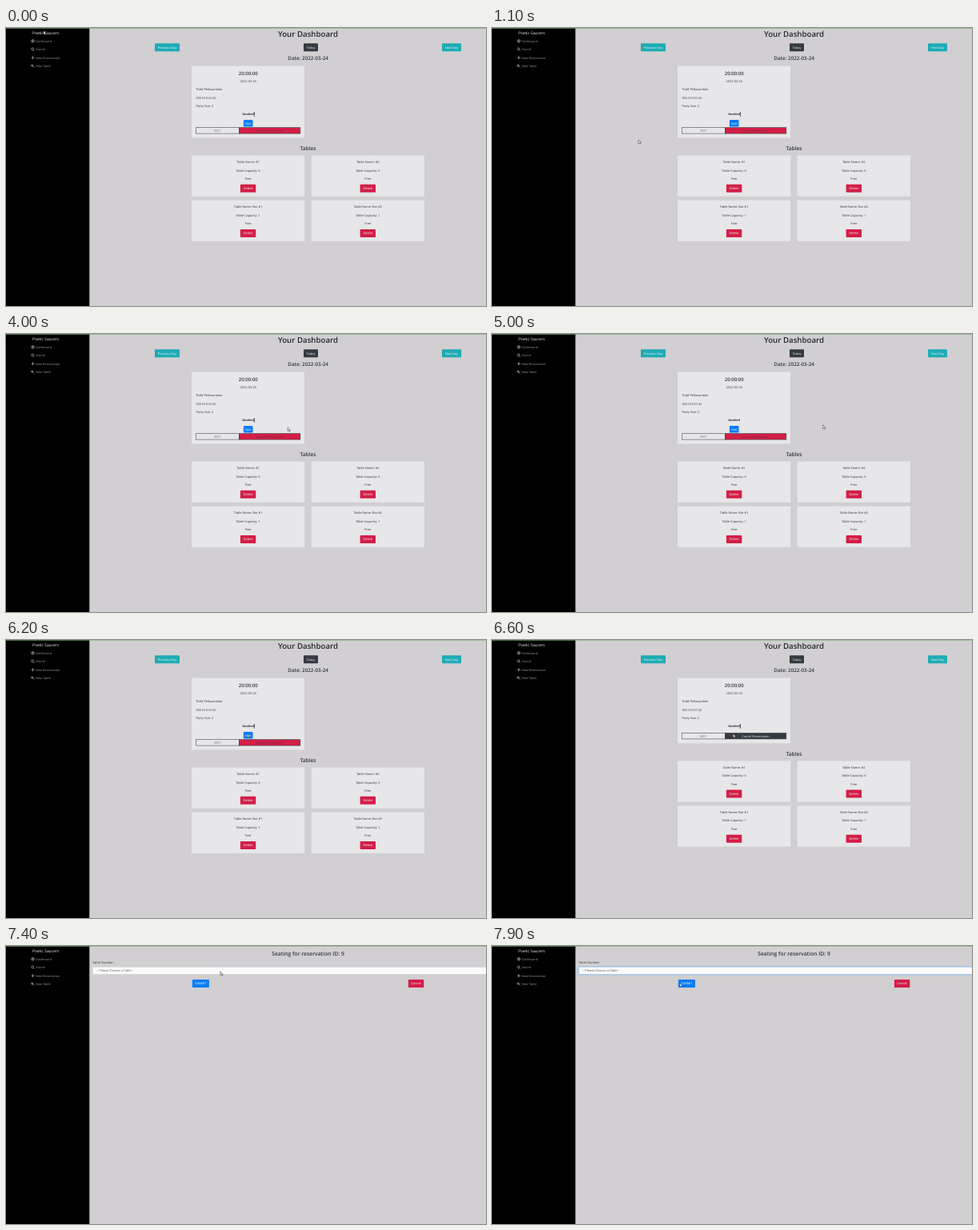
Recreate the animation shown at these times as an HTML page. Size 600 by 348 pixels, loop 8000 ms.

```html
<!DOCTYPE html>
<html lang="en">
<head>
<meta charset="utf-8">
<title>Reservation dashboard</title>
<style>
  html, body { margin: 0; width: 100%; height: 100%; overflow: hidden; background: #d1cfd1; }
  svg { display: block; width: 100%; height: 100%; }
  text {
    font-family: "Open Sans", "Noto Sans", sans-serif;
    text-rendering: geometricPrecision;
    white-space: pre;
  }
</style>
</head>
<body>
<svg id="stage" viewBox="0 0 600 348"></svg>
<script>
const LOOP = 8000, STEP = 100;
const SEAT_HIDDEN = 6600, SEATING_PAGE = 6700, SELECT_FOCUS = 7500;
const BODY = 3.9, ROW_SHIFT = -8.2;
const INK = "#35363a", DARK = "#343a40", RED = "#d41e47", BLUE = "#087df5", TEAL = "#1eabb5";
const stage = document.getElementById("stage");

function add(parent, tag, attrs) {
  const node = document.createElementNS("http://www.w3.org/2000/svg", tag);
  for (const key in attrs) node.setAttribute(key, attrs[key]);
  return parent.appendChild(node);
}
const group = parent => add(parent, "g", {});
const rect = (parent, x, y, width, height, fill, more) =>
  add(parent, "rect", { x, y, width, height, fill, ...more });

// y is the visual middle of the line
function label(parent, text, x, y, { size = BODY, fill = INK, weight = 400, anchor = "middle" } = {}) {
  const node = add(parent, "text", {
    x, y: y + size * 0.35, fill, "font-size": size, "font-weight": weight, "text-anchor": anchor
  });
  node.textContent = text;
  return node;
}
function button(parent, text, cx, cy, w, h, fill) {
  const node = group(parent);
  rect(node, cx - w / 2, cy - h / 2, w, h, fill, { rx: 0.9 });
  label(node, text, cx, cy, { fill: "#f4f6f8" });
  return node;
}
const show = (node, on) => node.setAttribute("display", on ? "inline" : "none");
const moveTo = (node, x, y) => node.setAttribute("transform", `translate(${x} ${y})`);

rect(stage, 0, 0, 600, 348, "#d1cfd1");

function buildDashboard() {
  const page = group(stage);
  label(page, "Your Dashboard", 377.5, 7.5, { size: 9.7, weight: 600, fill: "#26272b" });
  button(page, "Previous Day", 201.5, 24.2, 31, 10, TEAL);
  button(page, "Today", 381, 24.2, 18, 10, DARK);
  button(page, "Next Day", 557, 24.2, 24, 10, TEAL);
  label(page, "Date: 2022-03-24", 377.6, 37.3, { size: 6.3, weight: 600 });

  const card = rect(page, 232, 47.5, 141, 90, "#e7e6e8");
  label(page, "20:00:00", 302.7, 56.6, { size: 6, weight: 600 });
  label(page, "2022-03-24", 302.7, 66.6);
  ["Todd Pellavandian", "555-010-0142", "Party Size: 2"].forEach((line, i) =>
    label(page, line, 237.4, 76.9 + i * 10.4, { anchor: "start" }));
  label(page, "booked", 302.8, 108, { weight: 700 });
  const caret = rect(page, 310.3, 105, 0.7, 6, "#222");
  const seat = button(page, "Seat", 302.7, 119.3, 11.6, 8.6, BLUE);

  const actions = group(page);
  rect(actions, 237.3, 124.7, 54, 7.4, "#e7e6e8", { stroke: "#4b4f54", "stroke-width": 0.6 });
  label(actions, "EDIT", 264.3, 128.4, { fill: "#6c6e72" });
  const cancelBox = rect(actions, 291.3, 124.7, 76.5, 7.4, RED, { stroke: DARK, "stroke-width": 0.6 });
  const cancelText = label(actions, "Cancel Reservation", 329.5, 128.4);

  const tables = group(page);
  label(tables, "Tables", 377.5, 151, { size: 6.65, weight: 600 });
  const seats = [["#1", 6], ["#2", 6], ["Bar #1", 1], ["Bar #2", 1]];
  seats.forEach(([name, capacity], i) => {
    const x = 232 + (i % 2) * 149.7, y = 159.6 + (i >> 1) * 56.1, cx = x + 70.6;
    rect(tables, x, y, 141.2, 51.2, "#e7e6e8");
    label(tables, "Table Name: " + name, cx, y + 8.2);
    label(tables, "Table Capacity: " + capacity, cx, y + 18.6);
    label(tables, "Free", cx, y + 29);
    button(tables, "Delete", cx, y + 41.2, 19.4, 10, RED);
  });

  return t => {
    const seated = t >= SEAT_HIDDEN, dy = seated ? ROW_SHIFT : 0;
    show(page, t < SEATING_PAGE);
    show(caret, Math.floor((t - 2900) / 530) % 2 === 0);
    show(seat, !seated);
    card.setAttribute("height", 90 + dy);
    moveTo(actions, 0, dy);
    moveTo(tables, 0, dy);
    cancelBox.setAttribute("fill", seated ? DARK : RED);
    cancelText.setAttribute("fill", seated ? "#f0f1f2" : "#6f2638");
  };
}

function buildSeating() {
  const page = group(stage);
  label(page, "Seating for reservation ID: 9", 377.5, 9.2, { size: 6.75, weight: 600 });
  const caret = rect(page, 330.6, 4.5, 0.7, 9, "#222");
  label(page, "Table Number:", 108.3, 20.8, { anchor: "start" });
  const glow = rect(page, 107.6, 25.6, 500, 10.6, "none", {
    rx: 1.2, stroke: "#9cc4ee", "stroke-width": 1.2, "stroke-opacity": 0.7
  });
  const select = rect(page, 108.3, 26.3, 500, 9.2, "#fbfbfc", { rx: 0.8, "stroke-width": 0.5 });
  label(page, "-- Please Choose a Table --", 112.8, 30.9, { anchor: "start", fill: "#55585d" });
  button(page, "SUBMIT", 243.4, 47.1, 21, 10, BLUE);
  button(page, "Cancel", 512.6, 47.1, 19.4, 10, RED);

  return t => {
    const focused = t >= SELECT_FOCUS;
    show(page, t >= SEATING_PAGE);
    show(caret, !focused && Math.floor((t - SEATING_PAGE) / 530) % 2 === 0);
    show(glow, focused);
    select.setAttribute("stroke", focused ? "#78b4ee" : "#c6c8cc");
  };
}

function buildSidebar() {
  const bar = group(stage);
  rect(bar, 0, 0, 104.3, 348, "#000");
  label(bar, "Poetic Saucers", 33, 6, { size: 4.9, fill: "#f2f2f2", anchor: "start" });
  const icons = [
    "M31.7 0a1.8 1.8 0 1 0 3.6 0a1.8 1.8 0 1 0-3.6 0M32.5 0h2M33.5-1v2",
    "M31.8-.5a1.4 1.4 0 1 0 2.8 0a1.4 1.4 0 1 0-2.8 0M34.2.6l1.3 1.4",
    "M31.5 0h4M33.5-2v4",
    "M31.8-1.6h1.8v1.8h-1.8zM33-.4l2.4 2.2"
  ];
  ["Dashboard", "Search", "New Reservation", "New Table"].forEach((name, i) => {
    const y = 16.3 + i * 10.45;
    add(bar, "path", {
      d: icons[i], transform: `translate(0 ${y})`, fill: "none", stroke: "#b4b4b4", "stroke-width": 0.7
    });
    label(bar, name, 37, y, { fill: "#929292", anchor: "start" });
  });
  rect(stage, 0, 0, 600, 0.8, "#78b070", { opacity: 0.75 });
}

// time, x, y of the pointer tip
const pointerPath = [
  [0, 47, 3.6], [1000, 183, 140], [3700, 183, 140], [4200, 444, 104.5], [4700, 444, 104.5],
  [5000, 413.7, 113.8], [5600, 301.3, 117.6], [6900, 301.3, 117.6],
  [7400, 268, 32], [7700, 252, 41], [7900, 234.8, 46.6]
];
function pointerAt(t) {
  const next = pointerPath.findIndex(key => key[0] > t);
  if (next < 0) return pointerPath[pointerPath.length - 1].slice(1);
  const [t0, x0, y0] = pointerPath[next - 1], [t1, x1, y1] = pointerPath[next];
  const u = (t - t0) / (t1 - t0), ease = u * u * (3 - 2 * u);
  return [x0 + (x1 - x0) * ease, y0 + (y1 - y0) * ease];
}

const drawDashboard = buildDashboard();
const drawSeating = buildSeating();
buildSidebar();
const pointer = add(stage, "path", {
  d: "M0 0V4.5L1.1 3.5L1.9 5.1L2.7 4.7L2 3.2H3.3Z",
  fill: "#fff", stroke: "#222", "stroke-width": 0.5, "stroke-linejoin": "round"
});

function render(now) {
  const t = Math.floor((now % LOOP) / STEP) * STEP;
  drawDashboard(t);
  drawSeating(t);
  moveTo(pointer, ...pointerAt(t));
}

let start;
function tick(now) {
  start ??= now;
  render(Math.max(0, now - start));
  requestAnimationFrame(tick);
}
render(0);
requestAnimationFrame(tick);
</script>
</body>
</html>
```
